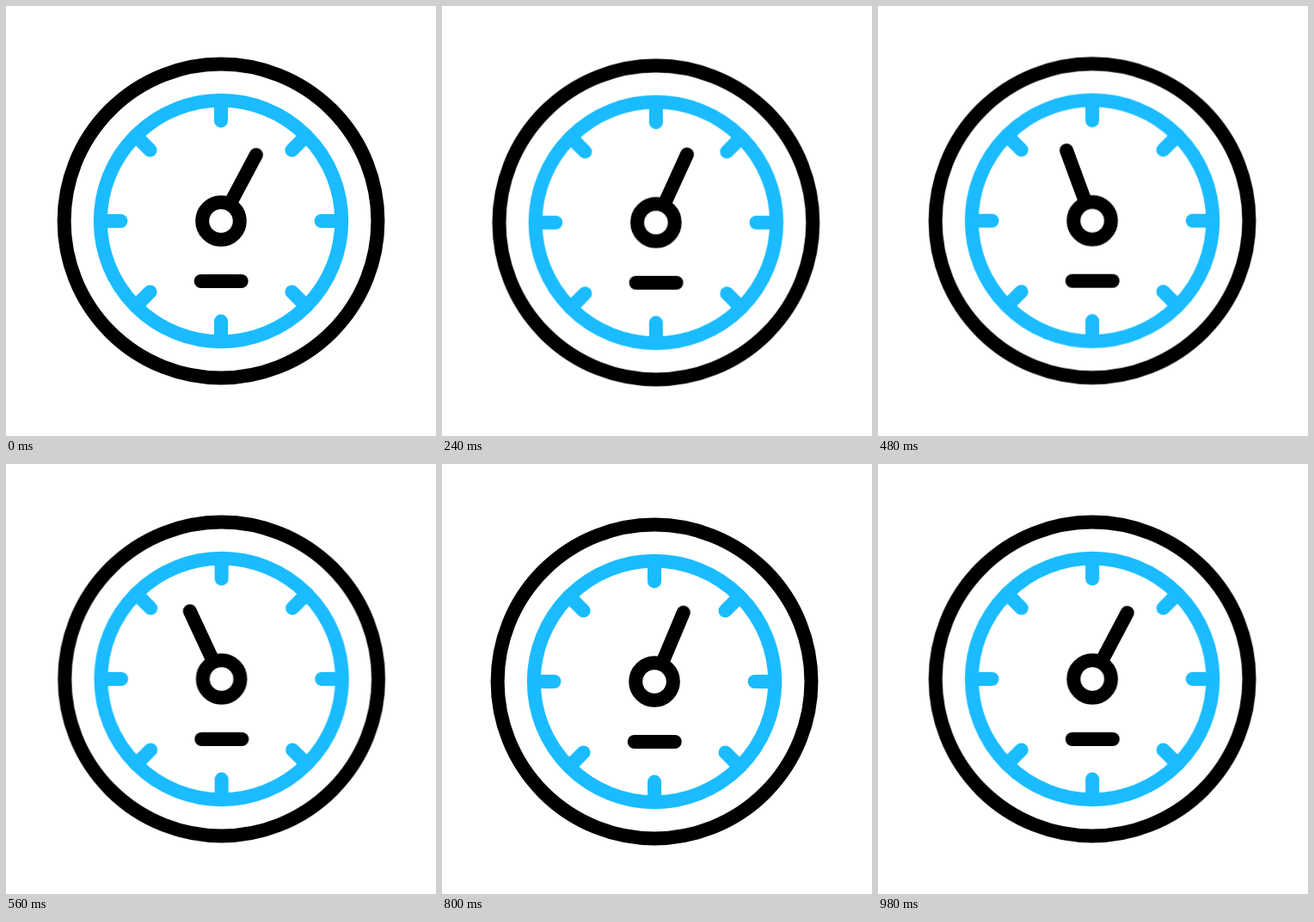
An HTML page without scripts for the animation above (1000 ms loop, 500x500 px).

```html
<!DOCTYPE html>
<html lang="en">
<head>
<meta charset="utf-8">
<title>Gauge</title>
<style>
  html, body { margin: 0; width: 100%; height: 100%; overflow: hidden; background: #fff; }
  svg { display: block; width: 100%; height: 100%; }
  .gauge {
    fill: none;
    stroke: #000;
    stroke-width: 16;
    stroke-linecap: round;
    animation: shake 1s ease-in-out infinite;
  }
  .scale { stroke: #1abcff; }
  .needle { animation: swing 1s linear infinite; }

  @keyframes shake {
    0%, 100% { transform: translate(0, 0); }
    6% { transform: translate(3px, -1.5px); }
    12% { transform: translate(-3px, 1px); }
    18% { transform: translate(2px, 0); }
    24%, 26% { transform: translate(-1.2px, 1.8px); }
    31% { transform: translate(3px, -1px); }
    38%, 40% { transform: translate(.2px, 1.5px); }
    46% { transform: translate(-3px, 0); }
    51% { transform: translate(3px, -1px); }
    56%, 58% { transform: translate(.6px, 0); }
    64% { transform: translate(3px, -1.5px); }
    70%, 72% { transform: translate(.7px, .4px); }
    80%, 82% { transform: translate(-3px, 3px); }
    86% { transform: translate(-4px, 0); }
    92% { transform: translate(3px, -1px); }
    98% { transform: translate(-.8px, 0); }
  }
  @keyframes swing {
    0%, 100% { transform: rotate(28deg); }
    24%, 26% { transform: rotate(24.5deg); }
    38%, 40% { transform: rotate(-15.2deg); }
    56%, 58% { transform: rotate(-25deg); }
    70%, 72% { transform: rotate(-33.8deg); }
    80%, 82% { transform: rotate(22.8deg); }
    98% { transform: rotate(27.8deg); }
  }
</style>
</head>
<body>
<svg viewBox="-250 -250 500 500">
  <defs>
    <path id="tick" d="M0-140V-116.6"/>
    <g id="ticks">
      <use href="#tick"/>
      <use href="#tick" transform="rotate(90)"/>
      <use href="#tick" transform="rotate(180)"/>
      <use href="#tick" transform="rotate(270)"/>
    </g>
  </defs>
  <g class="gauge">
    <circle r="182.4"/>
    <g class="scale">
      <circle r="140.2"/>
      <use href="#ticks"/>
      <use href="#ticks" transform="rotate(45)"/>
    </g>
    <path d="M-23.3 70H23.7"/>
    <circle r="21.8"/>
    <path class="needle" d="M0-24V-87"/>
  </g>
</svg>
</body>
</html>
```
